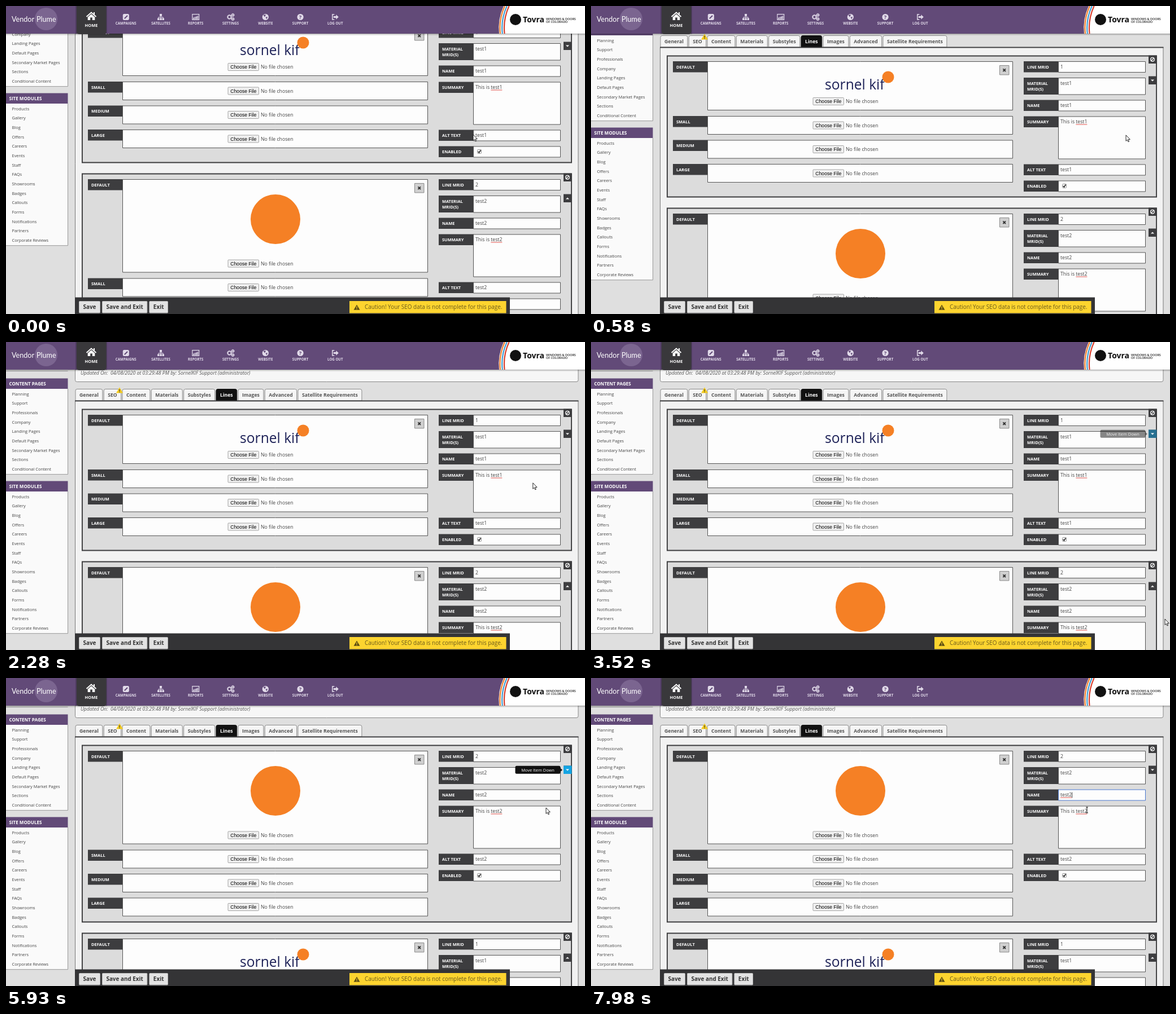
Animation, 1025 px wide and 546 px high, one loop 8 s. Source, as an HTML page with a canvas:

```html
<!DOCTYPE html>
<html lang="en">
<head>
<meta charset="utf-8">
<title>Line item editor</title>
<style>
html, body { margin: 0; width: 100%; height: 100%; overflow: hidden; background: #dedede; }
canvas { display: block; }
</style>
</head>
<body>
<canvas id="stage" width="1025" height="546"></canvas>
<script>
const ctx = document.getElementById('stage').getContext('2d');
const LOOP = 8000;
const SMALL = 7.44, MEDIUM = 8.68, LARGE = 9.92;
const DARK = '#3d3d3f', PURPLE = '#624a78', GREY = '#dcdcdc', ORANGE = '#f58025', INK = '#444', PALE = '#e2dbea';

function text(str, x, y, size, { color = INK, weight = 400, align = 'left', style = 'normal', family = '"Open Sans"' } = {}) {
  ctx.font = `${style} ${weight} ${size}px ${family}, sans-serif`;
  ctx.fillStyle = color;
  ctx.textAlign = align;
  ctx.fillText(str, x, y);
  return ctx.measureText(str).width;
}
function rect(x, y, w, h, fill) {
  ctx.fillStyle = fill;
  ctx.fillRect(x, y, w, h);
}
function box(x, y, w, h, fill, line, radius = 0, width = 1) {
  const o = width / 2;
  ctx.beginPath();
  ctx.roundRect(x + o, y + o, w - width, h - width, radius);
  ctx.fillStyle = fill;
  ctx.fill();
  ctx.lineWidth = width;
  ctx.strokeStyle = line;
  ctx.stroke();
}
function poly(points, fill) {
  ctx.beginPath();
  points.forEach(([x, y]) => ctx.lineTo(x, y));
  ctx.closePath();
  ctx.fillStyle = fill;
  ctx.fill();
}
function line(color, width, ...points) {
  ctx.strokeStyle = color;
  ctx.lineWidth = width;
  ctx.beginPath();
  points.forEach(([x, y]) => ctx.lineTo(x, y));
  ctx.stroke();
}
function disc(x, y, r, fill) {
  ctx.beginPath();
  ctx.arc(x, y, r, 0, Math.PI * 2);
  ctx.fillStyle = fill;
  ctx.fill();
}
function ring(x, y, r, color, width) {
  ctx.beginPath();
  ctx.arc(x, y, r, 0, Math.PI * 2);
  ctx.strokeStyle = color;
  ctx.lineWidth = width;
  ctx.stroke();
}
// Triangle pointing up (h > 0) or down (h < 0)
function triangle(x, y, halfWidth, h, fill) {
  poly([[x - halfWidth, y + h / 2], [x, y - h / 2], [x + halfWidth, y + h / 2]], fill);
}
function warning(x, y, r, fill, mark) {
  triangle(x, y, r * 1.1, r * 1.85, fill);
  rect(x - .6, y - r * .3, 1.2, r * .65, mark);
  rect(x - .6, y + r * .5, 1.2, 1.2, mark);
}

// Scrolling page

function sideList(title, top, items) {
  rect(0, top, 109.5, 18.5, PURPLE);
  text(title, 5.5, top + 12.4, 8.06, { color: '#fff', weight: 700 });
  const listTop = top + 18.5, pitch = 16.68, bottom = listTop + items.length * pitch + 1.5;
  rect(0, listTop, 109.5, bottom - listTop, '#fafafa');
  line('#999', 1, [0, bottom], [109.5, bottom], [109.5, listTop]);
  items.forEach((s, i) => text(s, 10.5, listTop + 11.5 + i * pitch, SMALL));
}
const PAGES = ['Planning', 'Support', 'Professionals', 'Company', 'Landing Pages', 'Default Pages',
  'Secondary Market Pages', 'Sections', 'Conditional Content'];
const MODULES = ['Products', 'Gallery', 'Blog', 'Offers', 'Careers', 'Events', 'Staff', 'FAQs', 'Showrooms',
  'Badges', 'Callouts', 'Forms', 'Notifications', 'Partners', 'Corporate Reviews'];
const TABS = ['General', 'SEO', 'Content', 'Materials', 'Substyles', 'Lines', 'Images', 'Advanced',
  'Satellite Requirements'];

function pageFrame() {
  box(122, 20, 891.5, 51, '#f6f6f6', '#888', 3);
  text('Updated On:  04/08/2020 at 03:29:48 PM by: SornelKIF Support (administrator)', 132, 58, MEDIUM,
    { style: 'italic', color: '#555' });
  box(122, 104, 891.5, 700, '#f2f2f2', '#777');
  let x = 122.5;
  for (const name of TABS) {
    const active = name === 'Lines', font = { weight: 700, color: active ? '#fff' : '#555' };
    const width = text(name, x, 97, MEDIUM, font) + 15;
    box(x, 83, width, 21.5, active ? '#111' : '#f5f5f5', active ? '#111' : '#8c8c8c', [3, 3, 0, 0]);
    text(name, x + 7.5, 97, MEDIUM, font);
    x += width + 1.3;
  }
  rect(122, 103.5, 891.5, 1.9, DARK);
  warning(201, 85.5, 5.5, '#f5cc1f', '#333');
}

function label(x, y, names) {
  rect(x, y, 62, names.length > 1 ? 30 : 19.5, DARK);
  names.forEach((s, i) => text(s, x + 6, y + 12.6 + i * 10.8, SMALL, { color: '#fff', weight: 700 }));
}
function chooser(y) {
  box(392.5, y - 7, 55.5, 14, '#f0f0f0', '#a5a5a5', 1);
  text('Choose File', 420.3, y + 3, 8.6, { align: 'center', color: '#000', family: '"Liberation Sans"' });
  text('No file chosen', 451, y + 3, MEDIUM);
}
function squiggle(x, y) {
  line('#e0504a', 1, [x, y], [x + 20, y]);
}

const LOGO = { id: 1, height: 87 }, BADGE = { id: 2, height: 165.5 };
const ROW = 19.5, GAP = 9.5;
const FIELDS = ['LINE MRID', 'MATERIAL MRID(S)', 'NAME', 'SUMMARY', 'ALT TEXT', 'ENABLED'];
const TALL = { 'MATERIAL MRID(S)': 30, SUMMARY: 75.5 };

function checkbox(y) {
  box(834, y - 4, 8, 8, '#f4f4f4', '#999', 1);
  line('#222', 1.4, [835.7, y], [837.4, y + 2], [840.5, y - 2.5]);
}

function field(name, y, h, id, focused) {
  label(766, y, name.startsWith('MATERIAL') ? name.split(' ') : [name]);
  box(827, y, 155, h + .5, '#fdfdfd', focused ? '#4a78d0' : '#555');
  if (name === 'ENABLED') return checkbox(y + 9.5);
  const prefix = { 'LINE MRID': '', SUMMARY: 'This is test' }[name] ?? 'test';
  const width = text(prefix + id, 831, y + 12.6, MEDIUM);
  const caret = 831.6 + width;
  if (name === 'SUMMARY' || (name === 'NAME' && focused)) squiggle(caret - 20.6, y + 14.5);
  if (focused) line('#222', .8, [caret, y + 5], [caret, y + 15]);
}

function moveButton(y, down, heat) {
  rect(987, y, 14.5, 14.5, DARK);
  ctx.globalAlpha = heat;
  rect(987, y, 14.5, 14.5, '#13a4e3');
  ctx.globalAlpha = 1;
  triangle(994, y + 7.5, 3, down ? -3 : 3, '#fff');
}
function disableButton(y) {
  rect(987, y, 14.5, 14.5, DARK);
  ring(994, y + 7.2, 3.3, '#fff', 1.3);
  line('#fff', 1.3, [991.9, y + 9.3], [996.1, y + 5.1]);
}
function closeButton(x, y) {
  box(x - 8.75, y - 8.75, 17.5, 17.5, '#d0d0d0', '#888');
  for (const d of [-2.3, 2.3]) line('#333', 1.8, [x - 2.3, y - d], [x + 2.3, y + d]);
}

function panel(top, item, first, state) {
  const height = Math.max(251, item.height + 148.5);
  box(134, top - .5, 868, height + 1, GREY, DARK, 0, 1.9);

  let y = top + 10;
  label(145, y, ['DEFAULT']);
  box(206, y, 541, item.height, '#fdfdfd', '#555');
  if (item === LOGO) {
    text('sornel kif', 414, top + 60, 24.6, { color: '#1d2157' });
    disc(526, top + 38, 10.5, ORANGE);
  } else {
    disc(477, top + 81, 44, ORANGE);
  }
  chooser(y + item.height - 16);
  closeButton(731.7, top + 25.7);

  ['SMALL', 'MEDIUM', 'LARGE'].forEach((name, i) => {
    const rowY = y + item.height + 10 + i * 42.5;
    label(145, rowY, [name]);
    box(206, rowY, 541, 33, '#fdfdfd', '#555');
    chooser(rowY + 16.5);
  });
  for (const name of FIELDS) {
    const h = TALL[name] ?? ROW;
    field(name, y, h, item.id, first && name === state.focus);
    y += h + GAP;
  }
  disableButton(top - .5);
  moveButton(top + 36.5, first, first ? state.heat : 0);
  return top + height;
}

function tooltip(alpha) {
  ctx.globalAlpha = alpha;
  ctx.beginPath();
  ctx.roundRect(901.5, 155.7, 80, 14, 2.5);
  ctx.fillStyle = '#111';
  ctx.fill();
  poly([[981.5, 160], [985, 163], [981.5, 166]], '#111');
  ctx.globalAlpha = Math.min(1, alpha * 1.8);
  text('Move Item Down', 941.5, 165.6, SMALL, { color: '#fff', align: 'center' });
  ctx.globalAlpha = 1;
}

// Fixed bars

const ICONS = {
  CAMPAIGNS(x) {
    box(x - 5.5, 14, 11, 11, PALE, PALE, 1.5);
    line(PURPLE, 2, [x - 2.5, 22.3], [x + 2.8, 17]);
  },
  SATELLITES(x) {
    rect(x - 2, 14, 4, 4, PALE);
    rect(x - .5, 18, 1, 4, PALE);
    line(PALE, 1, [x - 4, 22], [x - 4, 19.8], [x + 4, 19.8], [x + 4, 22]);
    for (const d of [-4.2, 0, 4.2]) rect(x + d - 1.7, 21.5, 3.4, 3.5, PALE);
  },
  REPORTS(x) {
    box(x - 6.5, 14, 13, 11, PURPLE, PALE, 0, 1.2);
    for (let i = 0; i < 4; i++) rect(x - 4.5 + i * 2.4, 20.5 - i, 1.7, 3 + i, PALE);
  },
  SETTINGS(x) {
    for (const [dx, dy, r] of [[-2, 0, 3], [4, -3.5, 1.7], [4, 3.5, 1.7]]) {
      ring(x + dx, 19.5 + dy, r, PALE, 1.6);
      ctx.setLineDash([1.3, 1.1]);
      ring(x + dx, 19.5 + dy, r + 1, PALE, 1);
      ctx.setLineDash([]);
    }
  },
  WEBSITE(x) {
    disc(x, 19.5, 5.6, PALE);
    triangle(x - 1.5, 17.5, 2.5, -4, PURPLE);
    triangle(x + 2, 21.5, 1.8, -4, PURPLE);
  },
  SUPPORT(x) {
    disc(x, 19.5, 5.6, PALE);
    text('?', x, 23, 9.5, { weight: 700, color: PURPLE, align: 'center' });
  },
  'LOG OUT'(x) {
    line(PALE, 1.5, [x - 1.5, 15], [x - 5, 15], [x - 5, 24], [x - 1.5, 24]);
    rect(x - 3, 18, 5, 3, PALE);
    poly([[x + 1.5, 15.3], [x + 6, 19.5], [x + 1.5, 23.7]], PALE);
  },
};

function homeTab() {
  rect(123, 0, 56, 50, 'rgba(0,0,0,.2)');
  box(125, -4, 52.5, 54, '#39383b', '#39383b', 4);
  line('#fff', 1.8, [142.5, 19], [151, 11.5], [159.5, 19]);
  triangle(151, 17, 6.3, 5.5, '#fff');
  rect(144.7, 19.5, 12.6, 5.5, '#fff');
  rect(149.2, 20.5, 3.6, 4.5, '#39383b');
  rect(155, 11, 2, 4, '#fff');
  text('HOME', 151, 37, SMALL, { color: '#fff', weight: 700, align: 'center' });
}

function clientBadge() {
  const edge = dx => {
    ctx.beginPath();
    ctx.moveTo(881 + dx, 0);
    ctx.quadraticCurveTo(870 + dx, 24, 873 + dx, 49);
  };
  edge(0);
  ctx.lineTo(1025, 49);
  ctx.lineTo(1025, 0);
  ctx.fillStyle = '#fff';
  ctx.fill();
  ['#f2802e', '#3d9bd0', '#d8402f'].forEach((color, i) => {
    edge(2 + i * 3.8);
    ctx.strokeStyle = color;
    ctx.lineWidth = 2.2;
    ctx.stroke();
  });
  disc(902, 24, 10, '#111');
  text('Tovra', 915, 29, 14, { color: '#111', weight: 700 });
  text('WINDOWS & DOORS', 956, 24.5, 5.4, { color: '#222', weight: 600 });
  text('OF COLORADO', 956, 30, 5.4, { color: '#222', weight: 600 });
}

function header() {
  rect(0, 49, 1025, 1, 'rgba(0,0,0,.3)');
  rect(0, 50, 1025, 2, 'rgba(0,0,0,.1)');
  rect(0, 0, 1025, 49, PURPLE);
  disc(71, 23, 20, '#7b6590');
  text('Vendor', 10, 28, 12.6, { color: '#fff', family: 'Lato' });
  text('Plume', 54, 28, 12.6, { color: '#fff', family: 'Lato' });
  homeTab();
  Object.entries(ICONS).forEach(([name, icon], i) => {
    const x = 212.3 + i * 61.75;
    icon(x);
    text(name, x, 33, 6.2, { color: PALE, weight: 700, align: 'center' });
  });
  clientBadge();
}

function footer() {
  rect(122, 516.5, 770, 30, '#343436');
  let x = 129;
  for (const name of ['Save', 'Save and Exit', 'Exit']) {
    const font = { weight: 700, color: '#333' };
    const width = text(name, x, 537.4, LARGE, font) + 15;
    box(x, 523, width, 21.5, '#e3e3e3', '#bbb', 1);
    text(name, x + 7.5, 537.4, LARGE, font);
    x += width + 3;
  }
  rect(608, 523, 277.5, 21.5, '#fdd42f');
  warning(621, 534, 5, '#5c4d12', '#fdd42f');
  text('Caution! Your SEO data is not complete for this page.', 635, 537.4, LARGE, { color: '#6a5a1c' });
}

// Pointer

const SHAPES = {
  arrow: [[0, 0], [0, 10.5], [2.4, 8.3], [4, 12], [5.6, 11.3], [4.1, 7.7], [7.3, 7.7]],
  hand: [[-1, 0], [1, 0], [1, 4.6], [6, 6.5], [5.2, 13.5], [-1, 13.5], [-4, 8], [-1, 9.2]],
};
function pointer({ x, y, kind }) {
  ctx.save();
  ctx.translate(x, y);
  if (kind === 'beam') {
    line('#111', 1, [0, -5], [0, 5]);
    for (const end of [-5, 5]) line('#111', 1, [-2, end], [2, end]);
  } else {
    poly(SHAPES[kind], '#fff');
    ctx.strokeStyle = '#111';
    ctx.lineWidth = .9;
    ctx.lineJoin = 'round';
    ctx.stroke();
  }
  ctx.restore();
}

// Timeline: the screen refreshes every TICK during a burst and rests between bursts

const TICK = 130;
const BURSTS = [[0, 150], [580, 1580], [1710, 2680], [2820, 3090], [3520, 4490], [4640, 5180], [5930, 6890], [7040, 7980]];
const HOVERS = [[2820, 3520], [4780, 6070]];
const SWAP = 5150, FIRST_FOCUS = 7160;

// Stops of the pointer: time, x, y
const STOPS = [[150, 827, 228], [710, 966, 229], [1850, 900, 335], [2680, 975, 140], [2820, 994, 165], [3390, 994, 165],
  [3520, 1016, 491], [4780, 994.5, 168], [5180, 994.5, 168], [5930, 956, 230], [6500, 765, 285], [7040, 850, 150],
  [7980, 878, 234]];

const ramp = (t, from, to) => Math.min(1, Math.max(0, (t - from) / (to - from)));
const mix = (a, b, k) => a + (b - a) * k;

function refreshTime(t) {
  const [from, to] = BURSTS.findLast(b => b[0] <= t);
  return t >= to ? to : from + Math.floor((t - from) / TICK) * TICK;
}
function hover(t, fadeIn) {
  return Math.max(...HOVERS.map(([enter, leave]) =>
    ramp(t, enter, enter + fadeIn) * (1 - ramp(t, leave - TICK, leave + TICK))));
}
function pointerAt(t) {
  const i = Math.max(1, STOPS.findIndex(s => s[0] >= t));
  const [t0, x0, y0] = STOPS[i - 1], [t1, x1, y1] = STOPS[i];
  const k = ramp(t, t0, t1), ease = k * k * (3 - 2 * k);
  const x = mix(x0, x1, ease), y = mix(y0, y1, ease);
  const onButton = x > 986 && x < 1001 && y > 155 && y < 171;
  return { x, y, kind: onButton ? 'hand' : t >= 7040 ? 'beam' : 'arrow' };
}

function draw(time) {
  const t = refreshTime(time);
  const scroll = 92 - 30 * ramp(t, 0, 150) - 62 * ramp(t, 450, 710);
  const state = { heat: hover(t, 100), focus: FIELDS[Math.min(2, Math.floor((t - FIRST_FOCUS) / 270))] };
  const items = t >= SWAP ? [BADGE, LOGO] : [LOGO, BADGE];

  rect(0, 0, 1025, 546, '#dfdfdf');
  ctx.save();
  ctx.translate(0, -Math.round(scroll));
  line('#999', 1, [0, 51.5], [109.5, 51.5]);
  sideList('CONTENT PAGES', 64.5, PAGES);
  sideList('SITE MODULES', 246.5, MODULES);
  pageFrame();
  const bottom = panel(119, items[0], true, state);
  panel(bottom + 19, items[1], false, state);
  tooltip(hover(t, 2 * TICK));
  ctx.restore();

  header();
  footer();
  pointer(pointerAt(t));
}

const start = performance.now();
function tick() {
  draw((performance.now() - start) % LOOP);
  requestAnimationFrame(tick);
}
tick();
</script>
</body>
</html>
```
